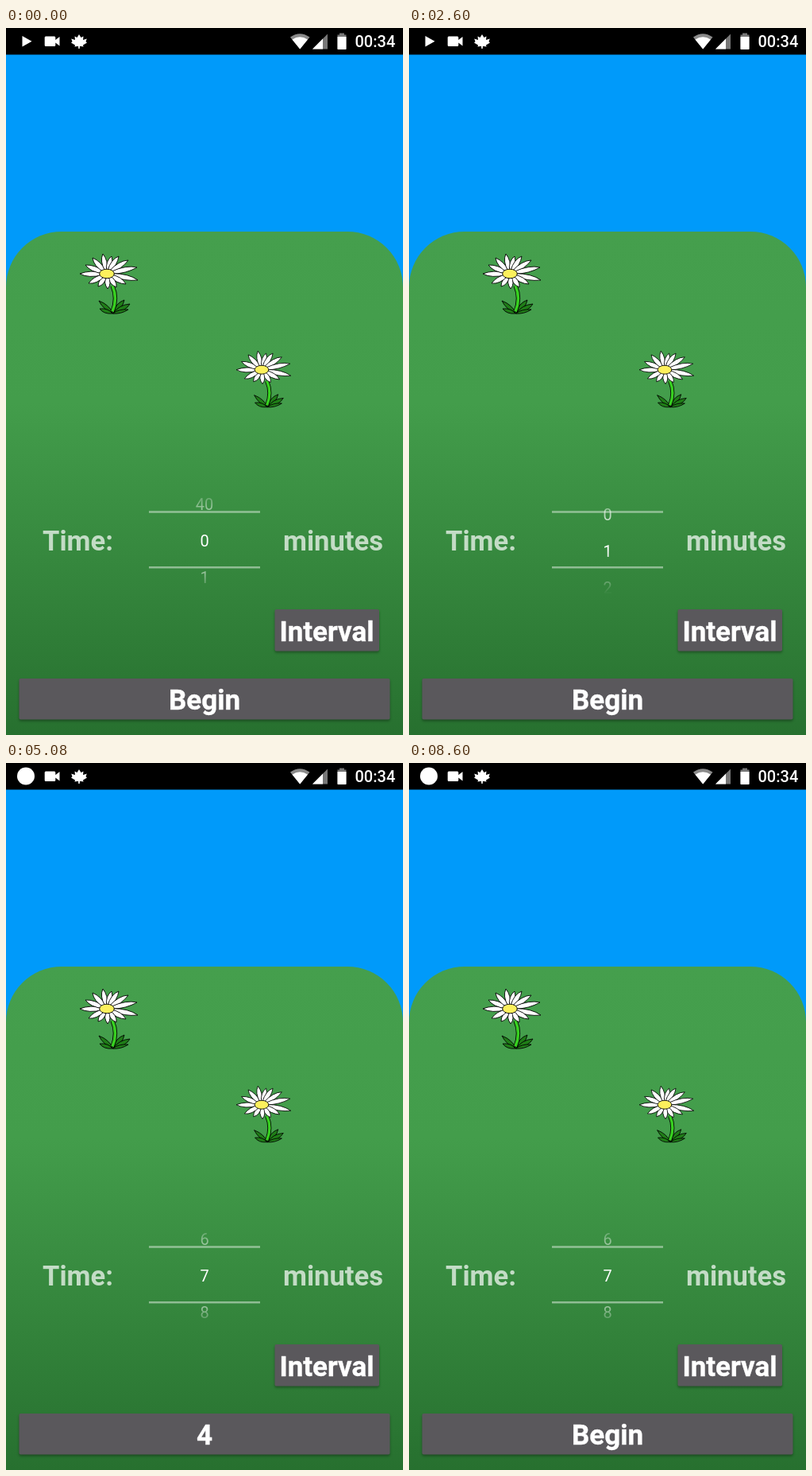
An HTML page that plays this animation: 500 px wide and 889 px high, repeating every 9.04 s.

```html
<!DOCTYPE html>
<html lang="en">
<head>
<meta charset="utf-8">
<title>Timer</title>
<style>
html, body { margin: 0; width: 100%; height: 100%; overflow: hidden; background: #000; }
svg { display: block; width: 100%; height: 100%; }
text { font-family: Roboto, sans-serif; fill: #fff; }
.mid { text-anchor: middle; }
.num { font-size: 20px; text-anchor: middle; }
.label { font-size: 34.6px; font-weight: 700; fill-opacity: .7; }
.caption { font-size: 35px; font-weight: 700; text-anchor: middle; stroke: #fff; stroke-width: .4px; }
.button { fill: #5a585c; filter: drop-shadow(0 2px 1.5px rgba(0,0,0,.32)); }

.wheel, .count, .ripple, .press, .play, .dot { animation: 9.04s linear infinite; }
.wheel { animation-name: wheel; }
.count { animation-name: count; animation-timing-function: step-end; }
.ripple { animation-name: ripple; transform-origin: 250px 844px; opacity: 0; }
.press { animation-name: press; }
.play { animation-name: play; transform-origin: 26px 16.5px; }
.dot { animation-name: dot; transform-origin: 25px 16.5px; }

/* swipe, then snap to the nearest value */
@keyframes wheel {
  0%, 28.1% { transform: translateY(0); animation-timing-function: cubic-bezier(.35,.3,.55,.95); }
  34.29% { transform: translateY(-299px); animation-timing-function: cubic-bezier(.22,1,.36,1); }
  43.14%, 100% { transform: translateY(-322px); }
}
@keyframes count {
  0% { transform: translateY(0); }
  45.56% { transform: translateY(-80px); }
  55.3% { transform: translateY(-160px); }
  66.8% { transform: translateY(-240px); }
  77.42% { transform: translateY(-320px); }
  83.61%, 100% { transform: translateY(0); }
}
@keyframes ripple {
  0%, 45.12%, 83.17% { transform: scale(0); opacity: 0; }
  46.3%, 84.4% { transform: scale(.3); opacity: .2; }
  50%, 88% { transform: scale(1); opacity: .13; }
  54.8%, 92.8% { transform: scale(1); opacity: 0; }
  54.81%, 92.81%, 100% { transform: scale(0); opacity: 0; }
}
@keyframes press {
  0%, 45.12%, 48.5%, 83.17%, 86.5%, 100% { filter: drop-shadow(0 2px 1.5px rgba(0,0,0,.32)); }
  46.3%, 47.4%, 84.4%, 85.5% { filter: drop-shadow(0 4px 4px rgba(0,0,0,.36)); }
}
@keyframes play {
  0%, 37.1% { transform: scale(1); opacity: 1; }
  39%, 100% { transform: scale(0); opacity: 0; }
}
@keyframes dot {
  0%, 37.1% { transform: scale(0); opacity: 0; }
  39.4%, 100% { transform: scale(1); opacity: 1; }
}
</style>
</head>
<body>
<svg viewBox="0 0 500 889" preserveAspectRatio="none">
  <defs>
    <linearGradient id="grass" gradientUnits="userSpaceOnUse" x1="0" y1="256" x2="0" y2="889">
      <stop offset="0" stop-color="#459f4d"/>
      <stop offset=".34" stop-color="#439d4b"/>
      <stop offset="1" stop-color="#27702f"/>
    </linearGradient>
    <linearGradient id="fade" gradientUnits="userSpaceOnUse" x1="0" y1="577" x2="0" y2="712">
      <stop offset="0" stop-color="#fff" stop-opacity="0"/>
      <stop offset=".42" stop-color="#fff"/>
      <stop offset=".58" stop-color="#fff"/>
      <stop offset="1" stop-color="#fff" stop-opacity="0"/>
    </linearGradient>
    <mask id="edges" maskUnits="userSpaceOnUse" x="180" y="577" width="140" height="135">
      <rect x="180" y="577" width="140" height="135" fill="url(#fade)"/>
    </mask>
    <clipPath id="inside"><rect x="16.5" y="818" width="467" height="51.5" rx="2"/></clipPath>
    <g id="flower" stroke="#000" stroke-linejoin="round">
      <g fill="#1f7d17" stroke-width=".9">
        <path d="M7 49Q-4 46-10 34Q3 39 7 49Z"/>
        <path d="M7 50Q-4 51-9 44Q2 43 7 50Z"/>
        <path d="M8 49Q11 37 22 33Q20 44 8 49Z"/>
        <path d="M8 50Q15 39 29 38Q24 47 8 50Z"/>
        <path d="M7 50Q16 44 27 45Q18 51 7 50Z"/>
      </g>
      <path d="M7 15Q14 31 7 48" fill="none" stroke-width="5.4"/>
      <path d="M7 15Q14 31 7 47.5" fill="none" stroke="#37cf20" stroke-width="3.6"/>
      <g id="petals" fill="#fff" stroke-width=".9"></g>
      <ellipse rx="9.3" ry="5.8" fill="#fdf05c" stroke-width=".9"/>
    </g>
  </defs>

  <rect width="500" height="889" fill="#009afa"/>
  <rect y="256" width="500" height="720" rx="70" fill="url(#grass)"/>
  <use href="#flower" transform="translate(127 309)"/>
  <use href="#flower" transform="translate(322 429.7) scale(.94)"/>

  <rect width="500" height="33.5"/>
  <g fill="#fff">
    <path class="play" d="M20.5 10V23.5L32.5 16.7Z"/>
    <circle class="dot" cx="25" cy="16.5" r="11"/>
    <path d="M50 10.5H61Q62.3 10.5 62.3 12V15L67.5 11V22.5L62.3 18.5V21.5Q62.3 23 61 23H50Q48.7 23 48.7 21.5V12Q48.7 10.5 50 10.5Z"/>
    <path d="M92 8L94.5 12L97.5 10.5L97 15L101.8 13.5L100.5 17L102 18.5L97 21.5L97.5 23.5L93 22.8L92.7 26H91.3L91 22.8L86.5 23.5L87 21.5L82 18.5L83.5 17L82.2 13.5L87 15L86.5 10.5L89.5 12Z"/>
    <path d="M358 11.5Q370 3 382.5 11.5L370.2 26.5Z" fill="#8a8a8a"/>
    <path d="M360.5 14.5Q370 8 380 14.5L370.2 26.5Z"/>
    <path d="M386 26.5H405V7.5Z" fill="#777"/>
    <path d="M386 26.5H399V13.5Z"/>
    <path d="M420 6.5H426V8.5H428.5V27H417.5V8.5H420Z" fill="#777"/>
    <path d="M417.5 11H428.5V26Q428.5 27 427.5 27H418.5Q417.5 27 417.5 26Z"/>
  </g>
  <text x="439.5" y="24.3" font-size="20" font-weight="500">00:34</text>

  <text class="label" x="46" y="657">Time:</text>
  <text class="label" x="349" y="657">minutes</text>
  <g mask="url(#edges)"><g class="wheel" id="wheel"></g></g>
  <path d="M180 608.5H320M180 678.3H320" stroke="#fff" stroke-opacity=".45" stroke-width="2.6"/>

  <rect class="button" x="338.5" y="731" width="131.5" height="52.5" rx="2"/>
  <text class="caption" x="404" y="771">Interval</text>

  <rect class="button press" x="16.5" y="818" width="467" height="51.5" rx="2"/>
  <g clip-path="url(#inside)">
    <circle class="ripple" cx="250" cy="844" r="240" fill="#fff"/>
    <g class="count" id="count"></g>
  </g>
</svg>
<script>
const fill = (id, html) => document.getElementById(id).innerHTML = html;

const tips = [[-34,0],[-27,-11],[-18,-20],[-5,-25],[6,-22],[15,-22],[27,-17],
  [38,-8],[39,8],[24,13],[12,17],[1,19],[-11,16],[-23,12]];
const petal = ([x, y]) => {
  const len = Math.hypot(x, y);
  const at = (along, side) =>
    `${(x * along - y / len * side).toFixed(1)} ${(y * along + x / len * side).toFixed(1)}`;
  return `<path d="M${at(.15, -1.5)}Q${at(.68, -6)} ${at(1, 0)}Q${at(.62, 5)} ${at(.15, 1.5)}Z"/>`;
};
fill('petals', tips.map(petal).join(''));

const rows = Array.from({ length: 12 }, (_, i) =>
  `<text class="num" x="250" y="${605.5 + i * 46}">${(i + 40) % 41}</text>`);
fill('wheel', rows.join(''));

fill('count', ['Begin', 5, 4, 3, 2].map((s, i) =>
  `<text class="caption" x="250" y="${857 + i * 80}">${s}</text>`).join(''));
</script>
</body>
</html>
```
